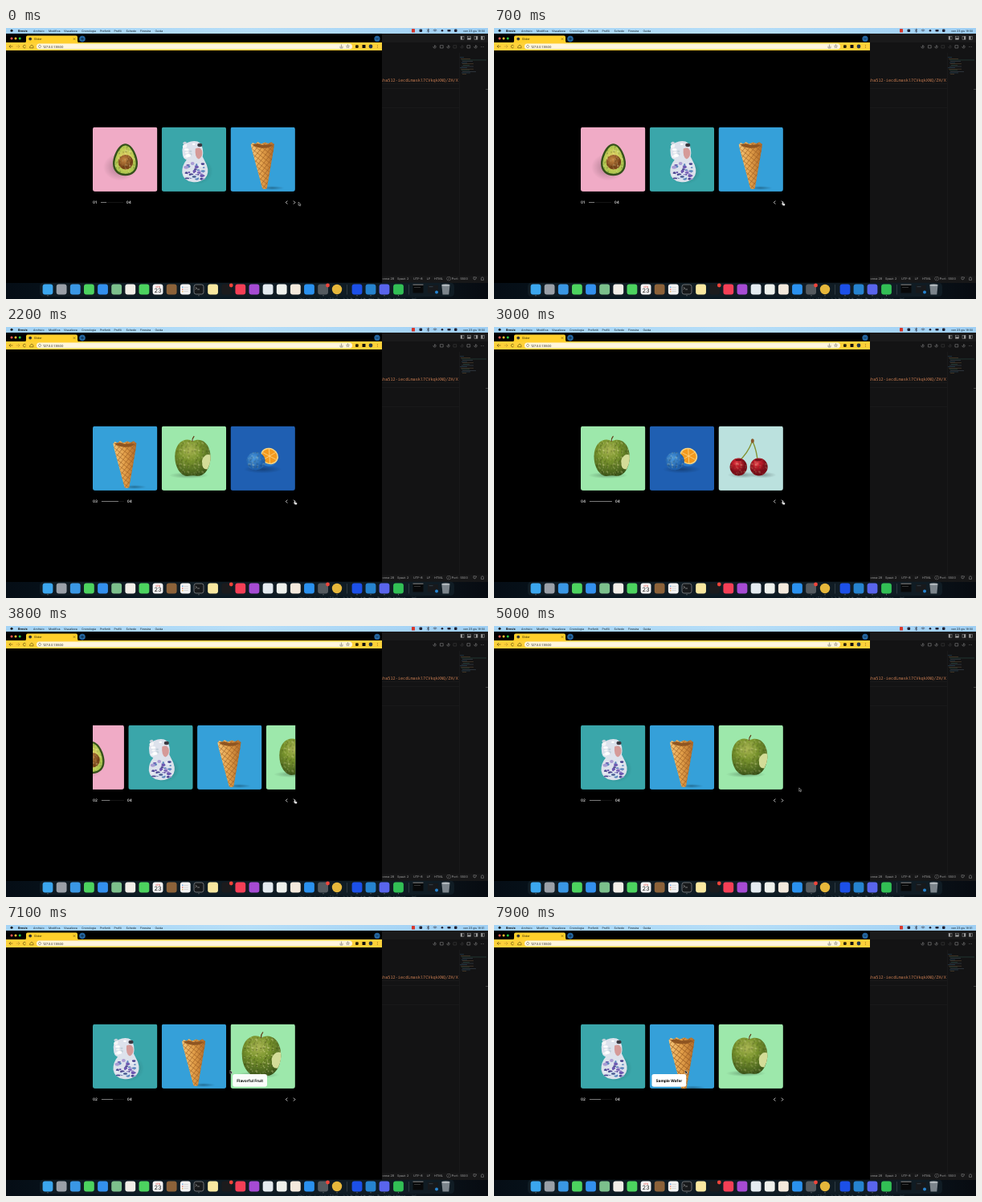
Recreate the animation shown at these times as an HTML page. Size 600 px wide and 338 px high, loop 8000 ms.

```html
<!DOCTYPE html>
<html lang="it">
<head>
<meta charset="utf-8">
<style>
html, body { margin: 0; width: 100%; height: 100%; overflow: hidden; background: #000; }
svg { display: block; width: 600px; height: 338px; }
text { font-family: Inter, sans-serif; white-space: pre; text-rendering: geometricPrecision; }
.line { fill: none; stroke-linecap: round; stroke-linejoin: round; }
</style>
</head>
<body>
<svg id="stage" viewBox="0 0 600 338">
  <defs>
    <linearGradient id="menu"><stop stop-color="#a3d3f5"/><stop offset=".5" stop-color="#b6def8"/><stop offset="1" stop-color="#a0d0f4"/></linearGradient>
    <linearGradient id="desk"><stop stop-color="#050d15"/><stop offset=".3" stop-color="#0a1a24"/><stop offset=".8" stop-color="#0c1820"/><stop offset="1" stop-color="#070b11"/></linearGradient>
    <linearGradient id="waffle"><stop stop-color="#f4c67a"/><stop offset=".5" stop-color="#e3a04a"/><stop offset="1" stop-color="#b06a28"/></linearGradient>
    <radialGradient id="peel" cx=".42" cy=".28" r=".75"><stop stop-color="#a9b552"/><stop offset=".4" stop-color="#78932c"/><stop offset="1" stop-color="#3a5419"/></radialGradient>
    <radialGradient id="flesh"><stop offset=".45" stop-color="#d9d060"/><stop offset="1" stop-color="#a9c64c"/></radialGradient>
    <radialGradient id="pit" cx=".4" cy=".35"><stop stop-color="#c98b45"/><stop offset="1" stop-color="#7b4519"/></radialGradient>
    <radialGradient id="cherry" cx=".4" cy=".3"><stop stop-color="#e8525a"/><stop offset=".35" stop-color="#c41c2a"/><stop offset="1" stop-color="#790d18"/></radialGradient>
    <radialGradient id="rind" cx=".4" cy=".35"><stop stop-color="#4c9be0"/><stop offset="1" stop-color="#1d60ad"/></radialGradient>
    <radialGradient id="shade"><stop stop-opacity=".3"/><stop offset="1" stop-opacity="0"/></radialGradient>
    <pattern id="grid" width="4.6" height="4.6" patternUnits="userSpaceOnUse" patternTransform="rotate(38)"><path d="M0 0H4.6M0 0V4.6" stroke="#96581e" stroke-width="1"/></pattern>
    <pattern id="glitter" width="18" height="18" patternUnits="userSpaceOnUse"></pattern>
    <clipPath id="card"><rect width="80.4" height="80.4" rx="3"/></clipPath>
    <clipPath id="view"><rect x="108" y="123.4" width="252.2" height="80.6"/></clipPath>
    <clipPath id="editor"><rect x="468" y="7" width="96" height="302"/></clipPath>
  </defs>
</svg>
<script>
const PITCH = 85.75, LOOP = 8000;
const get = id => document.getElementById(id);
const rect = (x, y, w, h, fill, r = 0) => `<rect x="${x}" y="${y}" width="${w}" height="${h}" rx="${r}" fill="${fill}"/>`;
const disc = (x, y, r, fill, ry = r) => `<ellipse cx="${x}" cy="${y}" rx="${r}" ry="${ry}" fill="${fill}"/>`;
const shape = (d, fill) => `<path d="${d}" fill="${fill}"/>`;
const line = (d, color, w = .6) => `<path class="line" d="${d}" stroke="${color}" stroke-width="${w}"/>`;
const text = (x, y, s, size, fill, extra = '') => `<text x="${x}" y="${y}" font-size="${size}" fill="${fill}" ${extra}>${s}</text>`;

let seed = 7;
const random = () => (seed = seed * 16807 % 2147483647) / 2147483647;
const scatter = (n, draw) => Array.from({ length: n }, (_, i) => draw(i)).join('');

function menuBar() {
  const items = [['Archivio', 34], ['Modifica', 53], ['Visualizza', 72], ['Cronologia', 94], ['Preferiti', 117],
    ['Profili', 134.5], ['Schede', 149.5], ['Finestra', 167], ['Guida', 185.5]];
  return rect(0, 0, 600, 7, 'url(#menu)') + disc(7, 3.3, 1.5, '#111') +
    text(15, 4.6, 'Brovix', 3.8, '#111', 'font-weight="700"') +
    items.map(([s, x]) => text(x, 4.6, s, 3.5, '#16242c')).join('') +
    rect(505, 1, 4, 4.6, '#d8372b', .6) + rect(514.5, 1.5, 3.6, 3.6, '#223', 1) +
    line('M524 2L527 4.5L525.5 5.5V1L527 2.2L524 4.5', '#223', .5) +
    line('M532 2.6Q534 1 536 2.6M533 3.8Q534 3 535 3.8', '#223') +
    disc(543, 3.2, 1.3, '#223') + rect(549.5, 2, 4, 2.4, '#223', .6) + rect(558, 1.5, 3.5, 3.5, '#223', 1) +
    text(569, 4.6, 'ven 23 giu <tspan id="clock">19:50</tspan>', 3.5, '#16242c');
}

function browser() {
  const ink = '#54430a';
  return rect(0, 7, 468, 311, '#000') + rect(0, 18, 468, 10, '#ffd23a') +
    shape('M23 18.5Q25 18 25 16V11.5Q25 9.5 27 9.5H87Q89 9.5 89 11.5V16Q89 18 91 18.5Z', '#ffd02b') +
    disc(7, 13, 1.5, '#fd5a52') + disc(12, 13, 1.5, '#fdbc2e') + disc(17.2, 13, 1.5, '#28c840') +
    disc(30.2, 13.6, 1.9, '#333') + text(34.8, 15, 'Slider', 3.7, '#3a2f08') +
    line('M84 12.6L86 14.6M86 12.6L84 14.6', ink, .5) +
    disc(95, 13.6, 3.8, '#24659f') + line('M93.4 13.6H96.6M95 12V15.2', '#061a2c') +
    disc(462, 13.4, 3.6, '#24659f') + line('M460.7 12.9L462 14.2L463.3 12.9', '#061a2c') +
    line('M8 23H4M5.6 21.4L4 23L5.6 24.6', ink) + line('M13 23H17M15.4 21.4L17 23L15.4 24.6', '#b9952a') +
    line('M24.5 22A1.8 1.8 0 1 0 24.5 24.2', ink) + line('M30 22.8L32 21L34 22.8V24.8H30Z', ink) +
    rect(38, 19.4, 393, 7.2, '#fff6dd', 3.6) + line('M42 21.4A1.6 1.6 0 1 0 42.1 21.4', '#555', .5) +
    text(46, 24.5, '127.0.0.1:5500', 3.9, '#222') +
    line('M416 23V25H419V23M417.5 24V21', '#555', .5) +
    line('M425.5 21L426.1 22.4L427.5 22.5L426.4 23.4L426.8 24.8L425.5 24L424.2 24.8L424.6 23.4L423.5 22.5L424.9 22.4Z', '#555', .4) +
    rect(435, 21.3, 3.7, 3.7, '#2c240b', .9) + rect(443.5, 21, 4, 4, '#111', .5) + disc(454, 23, 2.4, '#23364c') +
    [21.4, 23, 24.6].map(y => disc(462.3, y, .45, ink)).join('');
}

function codeEditor() {
  const tints = ['#2c4c62', '#634d32', '#2d5145', '#414e5a'];
  const miniMap = scatter(14, i =>
    rect(565 + [0, 1, 2, 3, 2, 3, 4, 2][i % 8], 36.5 + i * 1.6, i === 2 ? 31 : 5 + i * 7 % 13, .55, tints[i % 4]));
  const status = [['onna 28', 468.5], ['Spazi: 2', 487], ['UTF-8', 507], ['LF', 523.8], ['HTML', 533], ['⊘ Port : 5500', 548.5]];
  return rect(468, 7, 132, 311, '#131314') + rect(468, 7, 132, 11, '#1a1a1b') + rect(564, 31, .5, 278, '#202021') +
    [568, 576.5, 585, 593.5].map((x, i) =>
      `<rect x="${x - 2}" y="10.3" width="4" height="4" fill="none" stroke="#999" stroke-width=".5"/>` +
      rect(x - 2 + (i === 2 ? 2 : 0), i === 1 ? 12.3 : 10.3, i === 1 ? 4 : 2, i === 1 ? 2 : 4, '#999')).join('') +
    [533.5, 542.5, 550.5, 559, 567.5, 576, 584.5, 593].map((x, i) => {
      const tint = i === 3 || i === 4 ? '#444' : '#999';
      if (i === 7) return [-1.5, 0, 1.5].map(d => disc(x + d, 23.3, .4, tint)).join('');
      return i % 2 ? line(`M${x - 1.7} 21.7H${x + 1.7}V25H${x - 1.7}Z`, tint, .5)
        : line(`M${x - 1.7} 23.4A1.7 1.7 0 1 0 ${x} 21.7M${x} 22.5V23.5`, tint, .5);
    }).join('') +
    [69.6, 75, 99].map(y => rect(468, y, 96, .4, '#222224')).join('') + miniMap + rect(597, 76, 3, .7, '#555') +
    `<g clip-path="url(#editor)">` + text(466, 67.2, 'sha512-iecdLmaskl7CVkqkXNQ/ZH/X', 5.2, '#c67b50', 'style="font-family:\'DejaVu Sans Mono\',monospace"') + '</g>' +
    rect(468, 309, 132, 9, '#171718') + status.map(([s, x]) => text(x, 314.2, s, 3.8, '#a5a5a5')).join('') +
    line('M582 311V313.2L584 314L585.5 311.4Z', '#999', .5) +
    line('M591.5 314V312.5Q591.5 310.8 593 310.8Q594.5 310.8 594.5 312.5V314Z', '#999', .5);
}

function dock() {
  const colors = ['#3ba6ee', '#9aa0a8', '#3a97e4', '#4cd35f', '#3390ee', '#7cc08c', '#f2eee8', '#4cd35f', '#f6f6f6',
    '#8c6239', '#f2f2f2', '#17191b', '#f9e8a0', '#1b1b1d', '#f43f56', '#a64bd3', '#e4ebf0', '#eef1ec', '#f3e9dc', '#2a91ef', '#555b60'];
  const icon = (x, fill) => rect(x - 6.4, 319.6, 12.8, 12.8, fill, 3);
  return rect(0, 318, 600, 20, 'url(#desk)') +
    scatter(70, () => rect(360 + random() * 150, 336.6 + random(), 1 + random(), .5, '#46545e')) +
    rect(42, 317.8, 516, 17.2, '#101c24', 4.5) +
    colors.map((c, i) => icon(52 + i * 17.13, c)).join('') +
    text(189, 323.6, 'VEN', 3, '#e2453c', 'text-anchor="middle"') +
    text(189, 330.4, '23', 7.4, '#222', 'text-anchor="middle"') +
    `<rect x="234" y="320" width="12" height="12" rx="2.6" fill="none" stroke="#a5abb0" stroke-width=".6"/>` +
    line('M236 323.4L237.6 324.6L236 325.8M238.4 326H240.6', '#ddd', .5) +
    [323.3, 326, 328.7].map((y, i) => disc(219.8, y, .7, ['#368ce0', '#e24c43', '#f2a33b'][i]) + rect(221.4, y - .25, 5.5, .5, '#bbb')).join('') +
    disc(412, 326, 6.2, '#e6b73b') + disc(280.3, 321, 2.4, '#f0443a') + disc(400.5, 321, 2.4, '#f0443a') +
    rect(424, 320, .5, 12.5, '#4a565e') +
    icon(437, '#1c50e8') + icon(454, '#2683cf') + icon(471, '#5965ec') + icon(488.5, '#32bf55') +
    rect(501, 320, .5, 12.5, '#4a565e') +
    rect(506.5, 320, 13, 10.5, '#08090a') + rect(506.5, 319.6, 13, 1.2, '#777') + rect(508, 323, 8, .6, '#555') +
    rect(525, 321, 13, 9.5, '#17191c') + rect(526.5, 322.5, 5, .6, '#455866') + disc(536, 329.5, 2, '#2683cf') +
    shape('M542.3 320.5H552.5L551.3 332.5H543.5Z', '#7c858c') + disc(547.4, 320.7, 5.1, '#b4bbc0', 1.2) +
    [52, 240, 395, 412, 437, 454, 471, 488.5].map(x => disc(x, 333.8, .5, '#aaa')).join('');
}

// A surface filled with its colour and dusted with glitter.
const sparkly = (d, fill) => shape(d, fill) + shape(d, 'url(#glitter)');
const oval = (x, y, rx, ry) => `M${x - rx} ${y}a${rx} ${ry} 0 1 1 ${rx * 2} 0a${rx} ${ry} 0 1 1 ${-rx * 2} 0Z`;

const coneShape = 'M25.3 22L27.5 19.4L31 21L34 18.6L38 21L43 18.9L47 20.6L51 18.8L54.4 21.5L53.6 28L45.3 76.5Q42.5 78.6 39.6 76.5L26.8 29Z';
const appleShape = 'M38.5 19C31 13.5 16.5 19 16.5 38C16.5 52 24 62.4 32 62.4Q39 61 45 62.4C52 62.4 58 56 60 46Q61.5 40 60.5 34C58.5 19 47 14 38.5 19Z';

function figurine() {
  const patch = (n, x, y, w, h, tints) => scatter(n, i =>
    disc(x + (random() - .5) * w, y + (random() - .5) * h, 1 + random() * 2, tints[i % tints.length], .8 + random() * 1.3));
  return disc(44, 55, 20, 'url(#shade)', 17) +
    shape('M26 33Q24 24 32 19.5Q42 15.5 48 20Q53 27 51 37L56 47Q60 58 54 64Q47 70 38 68.5Q27 67 25.5 57Q25 48 31 41Q26 39 26 33Z', '#dde2ec') +
    shape('M42 27Q49 24 50.5 31Q51 38 46 40Q41 38 42 27Z', '#d59a98') + disc(47.5, 22.5, 3, '#3a3840', 2.2) +
    patch(14, 34, 29, 12, 18, ['#fff', '#c3d0da', '#f5f5f7']) +
    patch(38, 41, 55, 25, 20, ['#6c58b0', '#e9ecf5', '#4a4590', '#a99cd4', '#5b86bd']) +
    disc(40, 62, 6, '#d6e2f0', 2.6) + disc(40.5, 62, 2.6, '#45588f', 1.3);
}

get('glitter').innerHTML = scatter(70, i =>
  disc(1 + random() * 16, 1 + random() * 16, .35 + random() * .45, i % 2 ? 'rgba(255,250,190,.38)' : 'rgba(15,15,0,.3)'));

const cards = [
  ['#f0abc6', '', disc(34, 50, 21, 'url(#shade)', 17) +
    shape('M40.5 20.8C49 20.8 56 36 56 45.5C56 55 49.5 60.7 40.5 60.7C31.5 60.7 25 55 25 45.5C25 36 32 20.8 40.5 20.8Z', '#35501b') +
    sparkly('M40.8 23C47.5 23 53.6 37 53.6 45.5C53.6 53.5 48.5 58.3 40.8 58.3C33 58.3 27.4 53.5 27.4 45.5C27.4 37 34 23 40.8 23Z', 'url(#flesh)') +
    sparkly(oval(41, 43.7, 9.2, 9.2), 'url(#pit)')],
  ['#3aa6aa', '', figurine()],
  ['#35a0d9', 'Sample Wafer', disc(52, 76, 15, 'url(#shade)', 2.5) + shape(coneShape, 'url(#waffle)') + shape(coneShape, 'url(#grid)') +
    shape('M27.5 21.5L34 20.8L40 22.6L47 21.8L52.5 22.2Q49 26.6 40 26.2Q30 25.8 27.5 21.5Z', '#8f5521')],
  ['#9de8ab', 'Flavorful Fruit', disc(34, 61.5, 25, 'url(#shade)', 4) + sparkly(appleShape, 'url(#peel)') +
    shape('M60.7 36Q56 34.5 53 38Q49.5 42 50.5 46Q50 51 53.5 53.5L57 54Q60.5 48 60.9 41Z', '#d3dc98') +
    line('M38.2 19Q38 15.5 40.2 13', '#65431d', 1.2)],
  ['#1f5fb2', '', disc(40, 54, 24, 'url(#shade)', 5) +
    `<g transform="rotate(28 48.5 37.5)">` + disc(48, 39.5, 11.6, '#2b78c8', 11) + disc(48.5, 37.5, 11.2, '#f7d382', 10) + disc(48.5, 37.5, 9.7, '#f39a1e', 8.6) +
    line('M39.5 37.5H57.5M44 30L53 45M53 30L44 45', '#fbd98e', .7) + '</g>' +
    sparkly(oval(31.5, 43.7, 11.6, 11.2), 'url(#rind)')],
  ['#bbe1de', '', disc(30, 61, 19, 'url(#shade)', 4) + disc(55, 61, 17, 'url(#shade)', 4) +
    line('M42 19Q36 35 25 44', '#839233', 1.4) + line('M42.5 19Q48 32 48.5 44', '#839233', 1.4) + disc(42.3, 18.5, 2, '#89572a', 2.7) +
    sparkly(oval(24.8, 51, 10.7, 10.9), 'url(#cherry)') + sparkly(oval(50.2, 51, 11, 11), 'url(#cherry)') +
    disc(25, 42.4, 4, '#770f19', 1.2) + disc(49, 42.2, 4, '#770f19', 1.2)]
];

function slider() {
  const drawCard = ([color, label, art], i) => `<g transform="translate(${i * PITCH})"><g clip-path="url(#card)">` +
    rect(0, 0, 80.4, 80.4, color) + `<g class="art">${art}</g></g>` +
    `<g class="label" opacity="0">${label && rect(2.7, 62.6, 42.8, 15.6, '#fff', 2.6) +
      text(24.1, 72, label, 4.8, '#000', 'font-weight="700" text-anchor="middle"')}</g></g>`;
  const number = (x, s, extra = '') => text(x, 219.4, s, 4.7, '#fff', 'font-weight="500" ' + extra);
  return `<g clip-path="url(#view)"><g id="track">${cards.map(drawCard).join('')}</g></g>` + number(108, '01', 'id="page"') +
    `<g id="rail">${rect(118, 217.3, 28, .5, '#2a2a2a')}<rect id="bar" x="118" y="217.2" height=".7" fill="#a8a8a8"/>${number(149.8, '04')}</g>` +
    line('M350 215.9L348.3 217.6L350 219.3M358.2 215.9L359.9 217.6L358.2 219.3', '#fff', .8);
}

const pointer = '<g id="cursor"><path id="arrow" d="M0 0V4.4L1.1 3.5L1.8 5.1L2.6 4.8L1.9 3.2H3.2Z" fill="#111" stroke="#ddd" stroke-width=".45"/>' +
  '<path id="hand" d="M-.3 0Q.4-.6.8.1V2L2.8 2.5Q3.2 3 2.6 4.8H.6L-1 3Q-.9 2.4-.3 2.7Z" fill="#fff" stroke="#444" stroke-width=".3"/></g>';

get('stage').insertAdjacentHTML('beforeend', codeEditor() + browser() + dock() + slider() + menuBar() + pointer);

const arts = document.querySelectorAll('.art'), labels = document.querySelectorAll('.label');
const clamp = x => Math.min(1, Math.max(0, x));
const smooth = x => x * x * (3 - 2 * x);
const ease = (t, start) => smooth(clamp((t - start) / 300) ** .6);

const clicks = [910, 1610, 2310, 3010, 3710], pages = [0, 1, 2, 3, 0, 1];
const path = [[0, 364, 217], [100, 364, 217], [500, 359.3, 216.8], [4350, 359.3, 216.8], [4700, 380, 202], [4950, 380, 202],
  [5900, 347, 181], [6400, 347, 181], [7600, 238, 181], [LOOP, 238, 181]];

function cursorAt(t) {
  const i = path.findIndex(p => p[0] > t), [t0, x0, y0] = path[i - 1], [t1, x1, y1] = path[i];
  const k = smooth((t - t0) / (t1 - t0));
  return [x0 + (x1 - x0) * k, y0 + (y1 - y0) * k];
}

function hover(i, amount) {
  const s = 1 + .1 * amount;
  arts[i].setAttribute('transform', `translate(40.2 40.2) scale(${s}) translate(-40.2 -40.2)`);
  labels[i].setAttribute('opacity', amount);
}

function draw(now) {
  const t = now % LOOP;
  const page = pages[clicks.filter(c => t >= c).length];
  const index = clicks.reduce((sum, c, i) => sum + (pages[i + 1] - pages[i]) * ease(t, c), 0);
  get('track').setAttribute('transform', `translate(${108 - index * PITCH} 123.5)`);
  get('page').textContent = '0' + (page + 1);
  get('rail').setAttribute('transform', `translate(${page ? .9 : 0})`);
  get('bar').setAttribute('width', 7 * (index + 1));
  get('clock').textContent = t < 5900 ? '19:50' : '19:51';
  hover(3, ease(t, 5490) - ease(t, 7090));
  hover(2, ease(t, 7130));
  const [x, y] = cursorAt(t), onButton = x < 363 && y > 212 && t < 5000;
  get('cursor').setAttribute('transform', `translate(${x} ${y})`);
  get('arrow').setAttribute('visibility', onButton ? 'hidden' : 'visible');
  get('hand').setAttribute('visibility', onButton ? 'visible' : 'hidden');
  requestAnimationFrame(draw);
}
requestAnimationFrame(draw);
</script>
</body>
</html>
```
